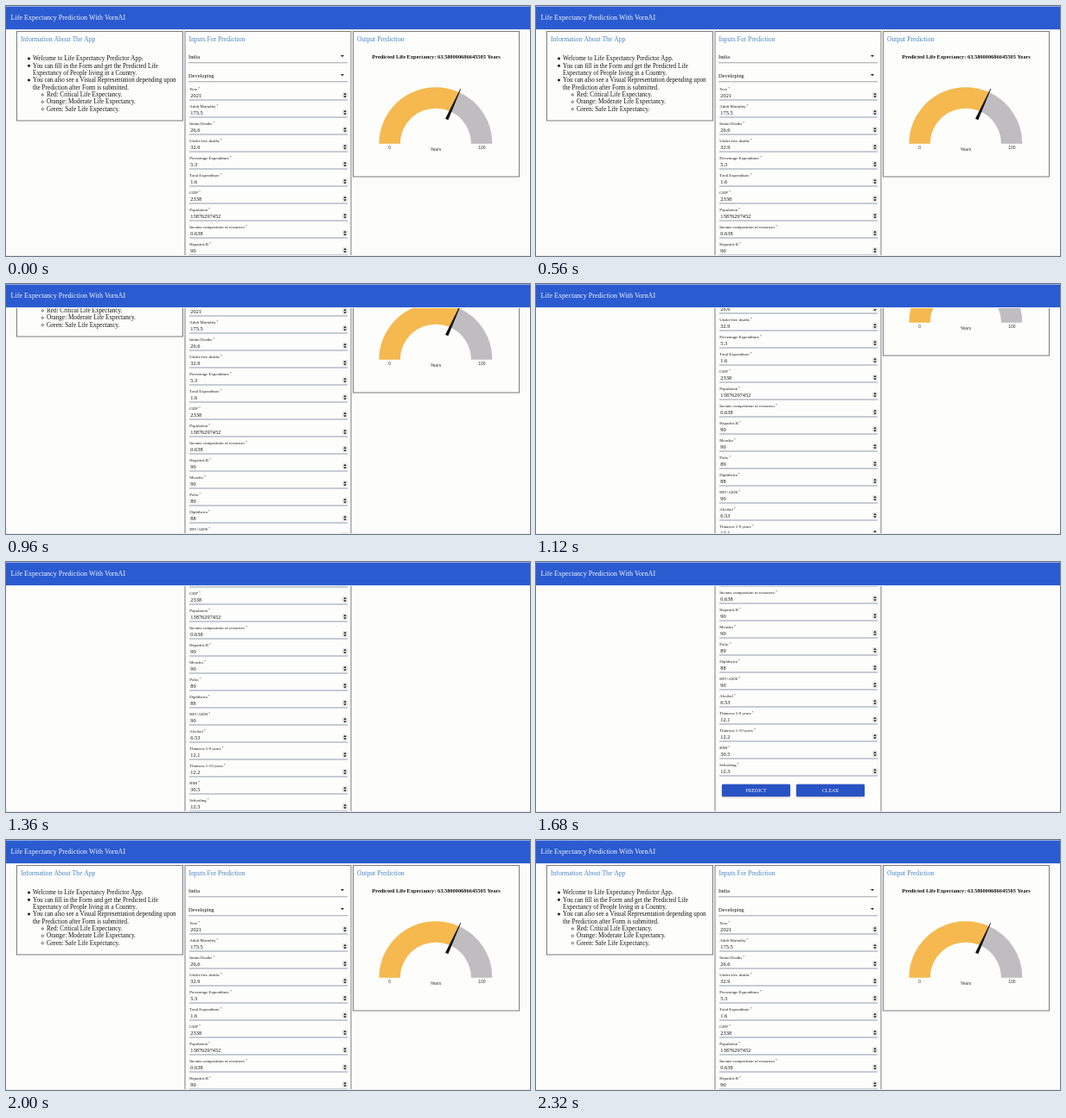
These frames come from a looping animation (606 px wide and 290 px high, 2400 ms). An HTML page with a canvas:

```html
<!DOCTYPE html>
<html lang="en">
<head>
<meta charset="utf-8">
<title>Life Expectancy Prediction</title>
<style>
html, body { margin: 0; width: 100%; height: 100%; overflow: hidden; background: #fcfcfa; }
canvas { display: block; }
</style>
</head>
<body>
<canvas id="stage" width="606" height="290"></canvas>
<script>
const ctx = document.getElementById('stage').getContext('2d');
const W = 606, H = 290, LOOP = 2400, STEP = 80;
const SERIF = '"Liberation Serif", "Times New Roman", serif';
const SANS = '"Liberation Sans", Arial, sans-serif';
const INK = '#161616', BLUE = '#2b5bd0', LINK = '#4a88c2';

const fields = [
  ['Year', '2021'], ['Adult Mortality', '175.5'], ['Infant Deaths', '26.6'],
  ['Under-five deaths', '32.9'], ['Percentage Expenditure', '5.3'],
  ['Total Expenditure', '1.6'], ['GDP', '2338'], ['Population', '13876297452'],
  ['Income composition of resources', '0.638'], ['Hepatitis B', '90'],
  ['Measles', '90'], ['Polio', '89'], ['Diphtheria', '88'], ['HIV/AIDS', '90'],
  ['Alcohol', '6.53'], ['Thinness 5-9 years', '12.1'],
  ['Thinness 1-19 years', '12.2'], ['BMI', '30.5'], ['Schooling', '12.3']
];

const info = [
  'Welcome to Life Expectancy Predictor App.',
  'You can fill in the Form and get the Predicted Life',
  'Expectancy of People living in a Country.',
  'You can also see a Visual Representation depending upon',
  'the Prediction after Form is submitted.',
  'Red: Critical Life Expectancy.',
  'Orange: Moderate Life Expectancy.',
  'Green: Safe Life Expectancy.'
];

// Scroll position: [time in ms, pixels]
const scrollKeys = [[0, 0], [640, 0], [960, 72], [1360, 180], [1520, 221],
  [1760, 221], [1920, 0], [LOOP, 0]];

function scrollAt(t) {
  const i = scrollKeys.findIndex(k => k[0] > t);
  const [t0, y0] = scrollKeys[i - 1], [t1, y1] = scrollKeys[i];
  return Math.round(y0 + (y1 - y0) * (t - t0) / (t1 - t0));
}

function text(str, x, y, size, color = INK, align = 'left', family = SERIF, weight = '') {
  ctx.font = `${weight} ${size}px ${family}`;
  ctx.fillStyle = color;
  ctx.textAlign = align;
  ctx.fillText(str, x, y);
}

function rect(x, y, w, h, color) {
  ctx.fillStyle = color;
  ctx.fillRect(x, y, w, h);
}

function poly(color, ...pts) {
  ctx.fillStyle = color;
  ctx.beginPath();
  pts.forEach(([x, y]) => ctx.lineTo(x, y));
  ctx.fill();
}

function card(x, y, w, h, title) {
  rect(x, y, w, h, '#fdfdfc');
  ctx.strokeStyle = '#7d7d82';
  ctx.lineWidth = 1;
  ctx.strokeRect(x + 0.5, y + 0.5, w - 1, h - 1);
  text(title, x + 5, y + 11.7, 7.65, LINK);
}

function infoCard() {
  card(12, 29, 193, 104.5, 'Information About The App');
  info.forEach((line, i) => {
    const y = 63.3 + i * 8.33, nested = i > 4;
    text(line, nested ? 47 : 31, y, 7.2);
    if (nested) {
      ctx.strokeStyle = INK;
      ctx.lineWidth = 0.6;
      ctx.beginPath();
      ctx.arc(42.3, y - 2, 1.2, 0, Math.PI * 2);
      ctx.stroke();
    } else if (i !== 2 && i !== 4) {
      rect(25.2, y - 3.6, 2.6, 2.6, INK);
    }
  });
}

function select(label, y) {
  text(label, 211, y + 2.2, 6.4);
  poly('#222', [387, y - 2], [391, y - 2], [389, y + 0.3]);
  rect(211, y + 6.3, 184, 1, '#a0a3a8');
}

function field([label, value], i) {
  const y = 96 + i * 20;
  text(label, 212.3, y + 1.7, 4.8, '#1c1c1c');
  const end = 213.3 + ctx.measureText(label).width;
  text('*', end, y + 0.8, 4, '#444');
  text(value, 213.3, y + 10, 6.4);
  rect(212, y + 12.5, 183, 1, '#8e9bb0');
  rect(389, y + 4, 6, 7, '#e6e6e6');
  poly('#222', [390.3, y + 7], [393.7, y + 7], [392, y + 4.8]);
  poly('#222', [390.3, y + 8.2], [393.7, y + 8.2], [392, y + 10.4]);
}

function button(label, x) {
  ctx.save();
  ctx.shadowColor = 'rgba(0, 0, 0, 0.35)';
  ctx.shadowBlur = 2;
  ctx.shadowOffsetY = 0.8;
  ctx.fillStyle = '#2853c4';
  ctx.beginPath();
  ctx.roundRect(x, 478.7, 79, 14.3, 1.2);
  ctx.fill();
  ctx.restore();
  text(label, x + 39.5, 488, 5.8, '#f4f6ff', 'center');
}

function formCard() {
  card(206.5, 29, 193, 484, 'Inputs For Prediction');
  select('India', 59);
  select('Developing', 81);
  fields.forEach(field);
  button('PREDICT', 215);
  button('CLEAR', 301);
}

function ring(cx, cy, from, to, color) {
  ctx.fillStyle = color;
  ctx.beginPath();
  ctx.arc(cx, cy, 65.5, from, to);
  ctx.arc(cx, cy, 41, to, from, true);
  ctx.fill();
}

function gaugeCard() {
  const cx = 496.9, cy = 159.7, a = Math.PI * (1 + 0.6358);
  card(401, 29, 193, 169.5, 'Output Prediction');
  text('Predicted Life Expectancy: 63.580000686645505 Years', 497.5, 61, 6.4, INK,
    'center', SERIF, 'bold');
  ring(cx, cy, Math.PI, a, '#f5b94f');
  ring(cx, cy, a, Math.PI * 2, '#bfbdc0');
  const at = (r, side) => [cx + r * Math.cos(a) - side * Math.sin(a),
    cy + r * Math.sin(a) + side * Math.cos(a)];
  poly('#111', at(31, -1.8), at(69.8, -0.4), at(69.8, 0.4), at(31, 1.8));
  text('0', 443.7, 166.4, 5, '#333', 'center', SANS);
  text('100', 550.3, 166.4, 5, '#333', 'center', SANS);
  text('Years', 497, 168, 5, '#333', 'center', SANS);
}

function header() {
  rect(0, 0, W, 1, '#fcfcfa');
  rect(0, 27, W, 1, '#e3e8f4');
  rect(0, 0.5, W, 26.5, BLUE);
  text('Life Expectancy Prediction With VornAI', 5.5, 16.4, 8.1, '#f5f7ff');
}

function draw(now) {
  const t = Math.floor(now % LOOP / STEP) * STEP;
  rect(0, 0, W, H, '#fcfcfa');
  ctx.save();
  ctx.translate(0, -scrollAt(t));
  infoCard();
  formCard();
  gaugeCard();
  ctx.restore();
  rect(0, 289, W, 1, '#ececec');
  header();
  requestAnimationFrame(draw);
}
requestAnimationFrame(draw);
</script>
</body>
</html>
```
